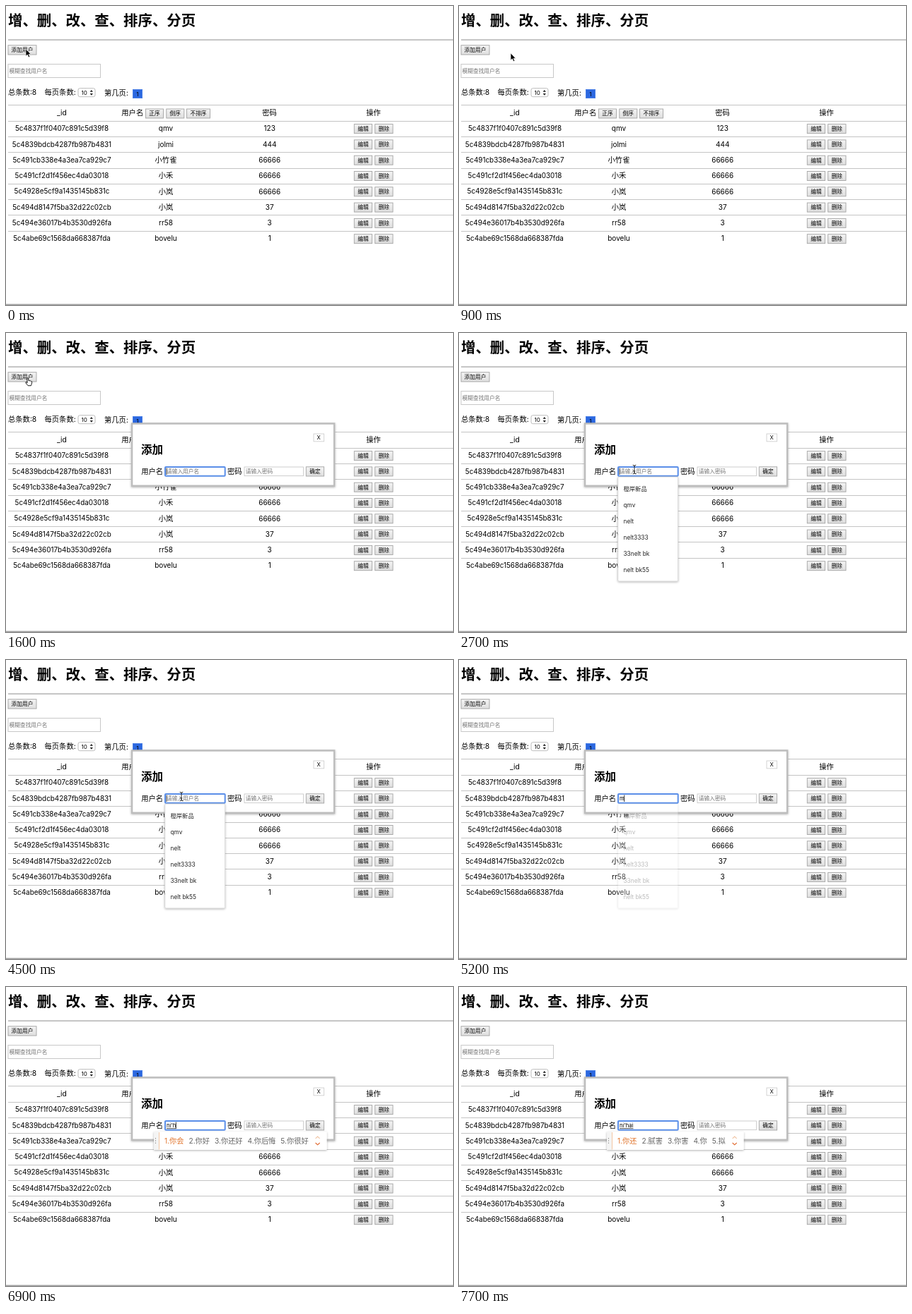
These frames come from a looping animation (632x424 px, 8 s). An HTML page:

```html
<!DOCTYPE html>
<html lang="zh">
<head>
<meta charset="utf-8">
<title>用户列表</title>
<style>
  html, body { margin: 0; width: 100%; height: 100%; overflow: hidden; background: #fff; }
  svg { display: block; width: 100%; height: 100%; }
  text { font-family: Inter, "Noto Sans CJK SC", "Noto Sans CJK", "Noto Sans", sans-serif; white-space: pre; }
</style>
</head>
<body>
<svg id="stage" viewBox="0 0 632 424" xmlns="http://www.w3.org/2000/svg">
  <defs>
    <filter id="soft" x="-20%" y="-20%" width="140%" height="150%">
      <feDropShadow dx="0" dy="1" stdDeviation="1.6" flood-color="#000" flood-opacity=".3"/>
    </filter>
    <linearGradient id="face" x2="0" y2="1">
      <stop stop-color="#f4f4f4"/><stop offset="1" stop-color="#dedede"/>
    </linearGradient>
  </defs>
</svg>
<script>
const NS = 'http://www.w3.org/2000/svg';
const stage = document.getElementById('stage');
const LOOP = 8000, STEP = 100;
const BODY = 10.3, SMALL = 7.7, GREY = '#757575';

function add(parent, tag, attrs = {}, content) {
  const el = document.createElementNS(NS, tag);
  for (const k in attrs) el.setAttribute(k, attrs[k]);
  if (content !== undefined) el.textContent = content;
  parent.appendChild(el);
  return el;
}
const group = (parent, attrs) => add(parent, 'g', attrs);
const path = (parent, d, attrs) => add(parent, 'path', { d, fill: 'none', ...attrs });

// y is the vertical middle of the glyphs
function label(parent, x, y, str, size = BODY, attrs = {}) {
  return add(parent, 'text', { x, y: y + size * 0.37, 'font-size': size, fill: '#000', ...attrs }, str);
}
const centred = (parent, x, y, str, size) => label(parent, x, y, str, size, { 'text-anchor': 'middle' });

function box(parent, x, y, width, height, attrs = {}) {
  return add(parent, 'rect', { x, y, width, height, fill: '#fff', ...attrs });
}
function button(parent, x, y, w, str, h = 13) {
  const face = box(parent, x, y, w, h, { fill: 'url(#face)', stroke: '#a3a3a3', 'stroke-width': 0.9 });
  centred(parent, x + w / 2, y + h / 2, str, SMALL);
  return face;
}
function rule(y, color) {
  path(page, `M3 ${y}H632`, { stroke: color });
}
const show = (el, on) => el.setAttribute('visibility', on ? 'visible' : 'hidden');

// ---- page ----
const page = group(stage);
label(page, 3, 20, '增、删、改、查、排序、分页', 20.4, { 'font-weight': 700 });
rule(48, '#8c8c8c');
const addButton = button(page, 3, 55.7, 40, '添加用户', 13.3);
box(page, 3, 82.5, 130.5, 19, { stroke: '#c8c8c8' });
label(page, 4.6, 92.2, '模糊查找用户名', SMALL, { fill: GREY });

label(page, 3, 122.3, '总条数:8');
label(page, 54.5, 122.3, '每页条数:');
box(page, 102, 116.7, 24, 12, { rx: 2.5, stroke: '#ababab', 'stroke-width': 0.8 });
label(page, 106.5, 122.8, '10', 8);
path(page, 'M118.6 121.8L120.8 119L123 121.8ZM118.6 124L120.8 126.8L123 124Z', { fill: '#222' });
label(page, 139, 123.3, '第几页:');
box(page, 179.5, 118.5, 13, 12, { fill: '#2c68e0', stroke: '#4a7fe6' });
centred(page, 186, 124.6, '1', 8);

const rows = [
  ['5c4837f1f0407c891c5d39f8', 'qmv', '123'],
  ['5c4839bdcb4287fb987b4831', 'jolmi', '444'],
  ['5c491cb338e4a3ea7ca929c7', '小竹雀', '66666'],
  ['5c491cf2d1f456ec4da03018', '小禾', '66666'],
  ['5c4928e5cf9a1435145b831c', '小岚', '66666'],
  ['5c494d8147f5ba32d22c02cb', '小岚', '37'],
  ['5c494e36017b4b3530d926fa', 'rr58', '3'],
  ['5c4abe69c1568da668387fda', 'bovelu', '1']
];
const PITCH = 22.3;
rule(140.5, '#c4c4c4');
centred(page, 79, 151.5, '_id');
label(page, 163.3, 151.5, '用户名');
button(page, 197.5, 146, 25, '正序');
button(page, 226.8, 146, 25, '倒序');
button(page, 255.5, 146, 33, '不排序');
centred(page, 372.5, 151.5, '密码');
centred(page, 519.5, 151.5, '操作');
rows.forEach(([id, name, pass], i) => {
  const y = 173.6 + i * PITCH;
  rule(Math.round(y - 11) + 0.5, '#c4c4c4');
  centred(page, 79, y, id, 9.9);
  centred(page, 226, y, name, /[a-z]/.test(name) ? 10 : BODY);
  centred(page, 372.7, y, pass, 10);
  button(page, 492.3, y - 6, 25.3, '编辑');
  button(page, 521.7, y - 6, 25.3, '删除');
});
path(page, 'M0 423.2H632', { stroke: '#777' });

// ---- dialog ----
const dialog = group(stage);
box(dialog, 176.8, 127.2, 288.6, 90.8, { fill: '#bdbdbd', filter: 'url(#soft)' });
box(dialog, 179.3, 129.7, 283.6, 85.8);
box(dialog, 435, 143, 14.6, 10.8, { stroke: '#cfcfcf', 'stroke-width': 0.9 });
centred(dialog, 442.2, 148.5, 'X', SMALL);
label(dialog, 191, 165.7, '添加', 15.5, { 'font-weight': 700 });
label(dialog, 191.2, 196, '用户名');
box(dialog, 225, 190, 84.7, 12.8, { rx: 1, stroke: '#5a8ee8', 'stroke-width': 2 });
label(dialog, 313, 196, '密码');
box(dialog, 337, 190, 83.5, 12.6, { stroke: '#c8c8c8', 'stroke-width': 0.9 });
label(dialog, 338.8, 196.4, '请输入密码', SMALL, { fill: GREY });
button(dialog, 424.3, 189.8, 25.3, '确定', 13.2);
const hint = label(dialog, 227, 196.4, '请输入用户名', SMALL, { fill: GREY });
const field = label(dialog, 227, 196.4, '', SMALL);
const underline = path(dialog, '', { stroke: '#222', 'stroke-width': 0.8 });
const caret = box(dialog, 226.6, 191.5, 0.8, 9.5, { fill: '#000' });

// ---- autofill list ----
const list = group(stage);
box(list, 224.7, 204, 85, 148, { rx: 1.5, stroke: '#c6c6c6', 'stroke-width': 0.7, filter: 'url(#soft)' });
['橙岸新品', 'qmv', 'nelt', 'nelt3333', '33nelt bk', 'nelt bk55'].forEach((s, i) =>
  label(list, 232.5, 221.2 + i * 22.9, s, 8.3, { fill: '#222' }));

// ---- input method bar ----
const ime = group(stage);
const imeBox = box(ime, 209, 205.3, 193, 25.7, { rx: 1, filter: 'url(#soft)' });
box(ime, 209, 205.3, 7, 25.7, { fill: '#f4f4f4' });
path(ime, 'M211.5 214V222', { stroke: '#888', 'stroke-dasharray': '1.3 2' });
path(ime, 'M216.5 206V230.5', { stroke: '#f3c7a4' });
const choices = label(ime, 224, 218.2, '', 10.2);
const chevrons = group(ime, { 'stroke-width': 1.1 });
path(chevrons, 'M-3 214.8L0 212L3 214.8', { stroke: '#f1c3a2' });
path(chevrons, 'M-3 221L0 223.8L3 221', { stroke: '#e0662a' });

// ---- pointers ----
const arrow = path(stage, 'M0 0V10.2L2.3 8L4 11.8L5.8 11L4.1 7.4H7.2Z',
  { fill: '#000', stroke: '#fff', 'stroke-width': 0.7 });
const hand = path(stage,
  'M2.2 1.2Q3.2 .2 4 1.2L4.5 4.6Q5.6 3.9 6.2 4.9Q7.3 4.4 7.8 5.4Q9.3 5.2 9.2 6.6L8.7 9.4L7.8 11.7H3.6L.6 8Q-.2 6.4 1.2 6.5L2.7 7.6Z',
  { fill: '#fff', stroke: '#000', 'stroke-width': 0.9 });
const beam = path(stage, 'M-2.3 -6Q0 -6 0 -4.3Q0 -6 2.3 -6M0 -4.3V4.8M-2.3 6.5Q0 6.5 0 4.8Q0 6.5 2.3 6.5M-1.3 2.6H1.3',
  { stroke: '#111', 'stroke-width': 0.9 });

// ---- timeline ----
const moves = [
  { from: 400, to: 700, a: [28, 61], b: [72.5, 66.5] },
  { from: 800, to: 1200, a: [73, 66.8], b: [27.5, 63], hold: 900 },
  { from: 1900, to: 2500, a: [27.5, 63], b: [248, 193.3] }
];
const typed = [
  [5200, 'm'], [6100, ''],
  [6600, 'n', '你 呢 那 能 年'],
  [6700, 'ni', '你 呢 尼 泥 拟'],
  [6900, "ni'h", '你会 你好 你还好 你后悔 你很好'],
  [7100, "ni'ha", '你好 你还 拟好 你哈 腻害'],
  [7300, "ni'hai", '你还 腻害 你害 你 拟']
];
const caretFlips = [1500, 2000, 2500, 3000, 3500, 4000, 4500, 5100, 5200, 5800, 6100, 6500, 6600, 7700];

function pointerAt(t) {
  let pos = moves[0].a;
  for (const { from, to, a, b, hold = from } of moves) {
    if (t < from) break;
    const p = Math.min(1, Math.max(0, (t - hold) / (to - hold)));
    const e = p * p * (3 - 2 * p);
    pos = a.map((v, i) => v + (b[i] - v) * e);
  }
  return pos;
}

function setChoices(words) {
  choices.textContent = '';
  words.split(' ').forEach((w, i) => add(choices, 'tspan',
    { dx: i ? 7 : 0, fill: i ? '#666' : '#e0732a' }, `${i + 1}.${w}`));
  const end = 224 + choices.getBBox().width;
  imeBox.setAttribute('width', end + 26 - 209);
  chevrons.setAttribute('transform', `translate(${end + 13} 0)`);
}

function render(t) {
  show(dialog, t >= 1500);
  addButton.setAttribute('fill', t === 1400 ? '#c9c9c9' : 'url(#face)');

  const [, text = '', words] = typed.filter(k => t >= k[0]).pop() || [];
  field.textContent = text;
  const end = 227 + (text ? field.getComputedTextLength() : 0);
  hint.setAttribute('display', text ? 'none' : 'inline');
  underline.setAttribute('d', words ? `M227 200.7H${end}` : '');
  caret.setAttribute('x', end - 0.4);
  const lit = caretFlips.filter(f => t >= f).length % 2;
  caret.setAttribute('display', lit ? 'inline' : 'none');

  show(list, t >= 2600 && t < 5300);
  list.setAttribute('opacity', t < 5100 ? 1 : t < 5200 ? 0.7 : 0.3);
  show(ime, !!words);
  if (words) setChoices(words);

  const [x, y] = pointerAt(t);
  const inField = x > 224 && y > 180;
  const onButton = t >= 1000 && x < 43 && y < 69;
  const shape = inField ? beam : onButton ? hand : arrow;
  for (const p of [arrow, hand, beam]) show(p, p === shape && t < 5100);
  shape.setAttribute('transform', `translate(${x} ${y})`);
}

let drawn = -1, start;
function tick(now) {
  start ??= now;
  const t = Math.floor((now - start) % LOOP / STEP) * STEP;
  if (t !== drawn) render(drawn = t);
  requestAnimationFrame(tick);
}
render(0);
requestAnimationFrame(tick);
</script>
</body>
</html>
```
